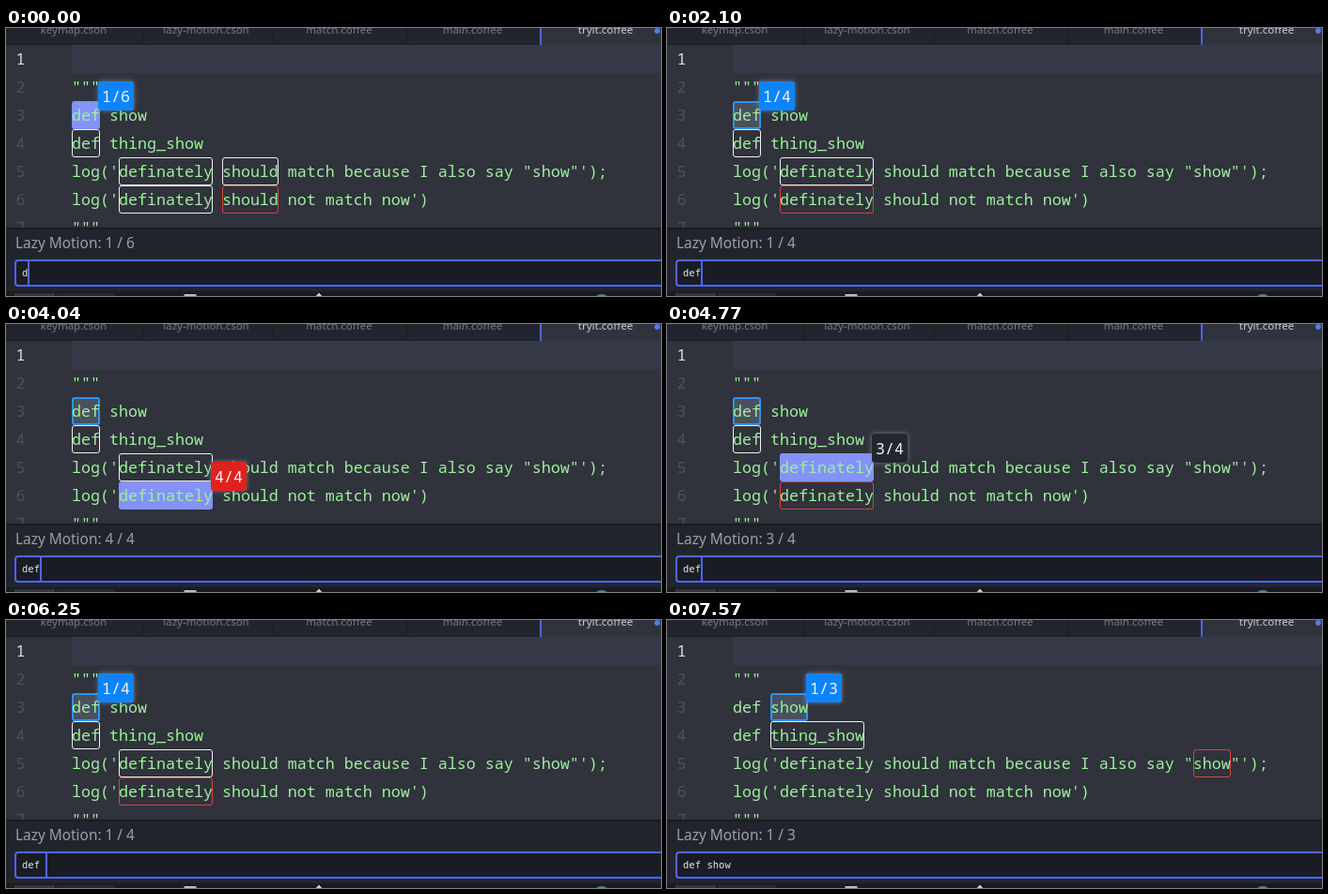
An HTML page for the animation above (8000 ms loop, 697 by 286 pixels).

```html
<!DOCTYPE html>
<html lang="en">
<head>
<meta charset="utf-8">
<title>Lazy Motion</title>
<style>
  html, body { margin: 0; width: 100%; height: 100%; overflow: hidden; background: #30323c; }
  svg { display: block; width: 697px; height: 286px; }
  text { white-space: pre; }
  .code { font: 16.667px "Noto Sans Mono", "DejaVu Sans Mono", monospace; fill: #9df29b; }
  .num { fill: #4c505f; }
  .num.on { fill: #dfe2ea; }
  .tab { font: 11.5px "Noto Sans", "Open Sans", sans-serif; fill: #747987; text-anchor: middle; }
  .tab.on { fill: #c9ccd5; }
  .info { font: 15.4px "Noto Sans", "Open Sans", sans-serif; fill: #9b9fab; }
  .query { font: 10.56px "DejaVu Sans Mono", monospace; fill: #e6e8ee; }
  .tip { font: 16.667px "Noto Sans Mono", "DejaVu Sans Mono", monospace; fill: #f2f5fa; }
</style>
</head>
<body>
<svg id="stage" viewBox="0 0 697 286">
  <defs>
    <filter id="glow" x="-40%" y="-40%" width="180%" height="180%">
      <feDropShadow dx="0" dy="0" stdDeviation="2.4" flood-color="#8d95a8" flood-opacity=".75"/>
    </filter>
  </defs>
  <rect width="697" height="286" fill="#30323c"/>
  <rect x="70" y="18" width="627" height="30" fill="#363947"/>
  <g id="tabs">
    <rect width="568" height="17" fill="#23252e"/>
    <rect y="17" width="568" height="1" fill="#191b21"/>
  </g>
  <g id="back"></g>
  <g id="lines"></g>
  <g id="front"></g>
  <rect y="213" width="697" height="73" fill="#22242d"/>
  <rect y="213" width="697" height="2" fill="#191b21"/>
  <text id="info" class="info" x="10" y="235"></text>
  <rect x="10" y="248" width="700" height="27" rx="3" fill="#1a1c23" stroke="#4e66fb" stroke-width="2"/>
  <text id="query" class="query" x="17" y="265"></text>
  <rect id="caret" y="249" width="2" height="25" fill="#4e66fb"/>
  <g>
    <rect y="281" width="697" height="5" fill="#191b21"/>
    <rect x="9" y="283" width="43" height="3" fill="#34363f"/>
    <rect x="54" y="283" width="62" height="3" fill="#272932"/>
    <rect x="190.5" y="285" width="11" height="8" fill="none" stroke="#b9bcc4" stroke-width="2"/>
    <path d="M333 282.5L337 287H329Z" fill="#e8cdb4"/>
    <circle cx="634" cy="293" r="9" fill="#2f8fc4"/>
  </g>
</svg>
<script>
const LOOP = 8000, CELL = 10, LEFT = 70;
const $ = id => document.getElementById(id);

const LINES = [
  '', '"""', 'def show', 'def thing_show',
  `log('definately should match because I also say "show"');`,
  `log('definately should not match now')`, '"""'
];

// start ms, query, selected match, flash, caret
const STEPS = [
  [0, 'd', 0, 1, 1], [150, 'd', 0, 0, 1],
  [300, 'de', 0, 1, 1], [450, 'def', 0, 1, 1], [600, 'def', 0, 0, 1],
  [900, 'def', 0, 0, 0], [1350, 'def', 0, 0, 1],
  [1800, 'def', 0, 0, 0], [2100, 'def', 0, 0, 1],
  [2550, 'def', 0, 0, 0], [3000, 'def', 0, 0, 1], [3300, 'def', 0, 0, 0],
  [3750, 'def', 1, 1, 1], [3900, 'def', 2, 1, 1], [4040, 'def', 3, 1, 1],
  [4190, 'def', 3, 0, 1], [4480, 'def', 3, 0, 0],
  [4770, 'def', 2, 1, 1], [4920, 'def', 1, 1, 1], [5070, 'def', 1, 0, 0],
  [5370, 'def', 0, 1, 1], [5510, 'def', 0, 0, 1], [5810, 'def', 0, 0, 0],
  [6100, 'def ', 0, 1, 1], [6250, 'def ', 0, 0, 1],
  [6550, 'def s', 0, 1, 1], [6690, 'def s', 0, 0, 1],
  [6840, 'def sh', 0, 1, 1], [6990, 'def sho', 0, 1, 1],
  [7130, 'def show', 0, 1, 1], [7280, 'def show', 0, 0, 1], [7570, 'def show', 0, 0, 0]
];

function add(parent, tag, attrs, text) {
  const el = document.createElementNS('http://www.w3.org/2000/svg', tag);
  for (const k in attrs) el.setAttribute(k, attrs[k]);
  if (text !== undefined) el.textContent = text;
  parent.appendChild(el);
  return el;
}

// The last word picks tokens by letters in order; earlier words filter whole lines.
function findMatches(query) {
  const tests = query.trim().split(' ').map(w => new RegExp([...w].join('.*')));
  const last = tests.pop(), found = [];
  LINES.forEach((line, row) => {
    if (!tests.every(r => r.test(line))) return;
    for (const m of line.matchAll(/\w+/g)) {
      if (last.test(m[0])) {
        found.push({ x: LEFT + m.index * CELL, w: m[0].length * CELL, mid: 33 + row * 30 });
      }
    }
  });
  return found;
}

function drawBox(m, kind, flash) {
  if (flash) {
    add($('back'), 'rect', { x: m.x, y: m.mid - 15, width: m.w, height: 30, rx: 3, fill: '#8492fa' });
  } else if (kind === 'first') {
    add($('back'), 'rect', { x: m.x + 1, y: m.mid - 14, width: m.w - 2, height: 28, rx: 2,
      fill: '#4b505e', stroke: '#2d93ee', 'stroke-width': 2 });
  } else {
    add($('back'), 'rect', { x: m.x + .5, y: m.mid - 14.5, width: m.w - 1, height: 29, rx: 2.5,
      fill: 'none', stroke: kind === 'last' ? '#d8453f' : '#eef0f4' });
  }
}

function drawTip(m, kind, label) {
  const x = m.x + m.w - 2, y = m.mid - 36;
  const fill = { first: '#0b84fb', last: '#df241f', mid: '#22252d' }[kind];
  add($('front'), 'rect', { x, y, width: 38, height: 31, rx: 3, fill, filter: 'url(#glow)' });
  add($('front'), 'text', { class: 'tip', x: x + 4, y: y + 22 }, label);
}

function draw([, query, pick, flash, caret]) {
  $('back').replaceChildren();
  $('front').replaceChildren();
  const list = findMatches(query), total = list.length;
  const kind = i => i === 0 ? 'first' : i === total - 1 ? 'last' : 'mid';
  list.forEach((m, i) => drawBox(m, kind(i), flash && i === pick));
  drawTip(list[pick], kind(pick), `${pick + 1}/${total}`);
  $('info').textContent = `Lazy Motion: ${pick + 1} / ${total}`;
  $('query').textContent = query;
  $('caret').setAttribute('x', Math.round(17 + query.length * 6.36));
  $('caret').setAttribute('opacity', caret);
}

function build() {
  const tabs = $('tabs');
  [['keymap.cson', 72], ['lazy-motion.cson', 213], ['match.coffee', 354.5],
   ['main.coffee', 496.5], ['tryit.coffee', 638]].forEach(([name, x], i) => {
    add(tabs, 'text', { class: i === 4 ? 'tab on' : 'tab', x, y: 6 }, name);
  });
  [145, 284, 426].forEach(x => add(tabs, 'rect', { x, y: 0, width: 1, height: 17, fill: '#191b21' }));
  add(tabs, 'rect', { x: 568, y: 0, width: 2, height: 18, fill: '#4e66fb' });
  add(tabs, 'circle', { cx: 693, cy: 3, r: 3, fill: '#4e78f5' });
  LINES.forEach((line, i) => {
    const y = 39 + i * 30;
    add($('lines'), 'text', { class: i ? 'code num' : 'code num on', x: 10.5, y }, i + 1);
    add($('lines'), 'text', { class: 'code', x: LEFT, y }, line);
  });
}

let shown = null;
function tick() {
  const t = performance.now() % LOOP;
  const step = STEPS.findLast(s => s[0] <= t);
  if (step !== shown) draw(shown = step);
  requestAnimationFrame(tick);
}

build();
tick();
</script>
</body>
</html>
```
